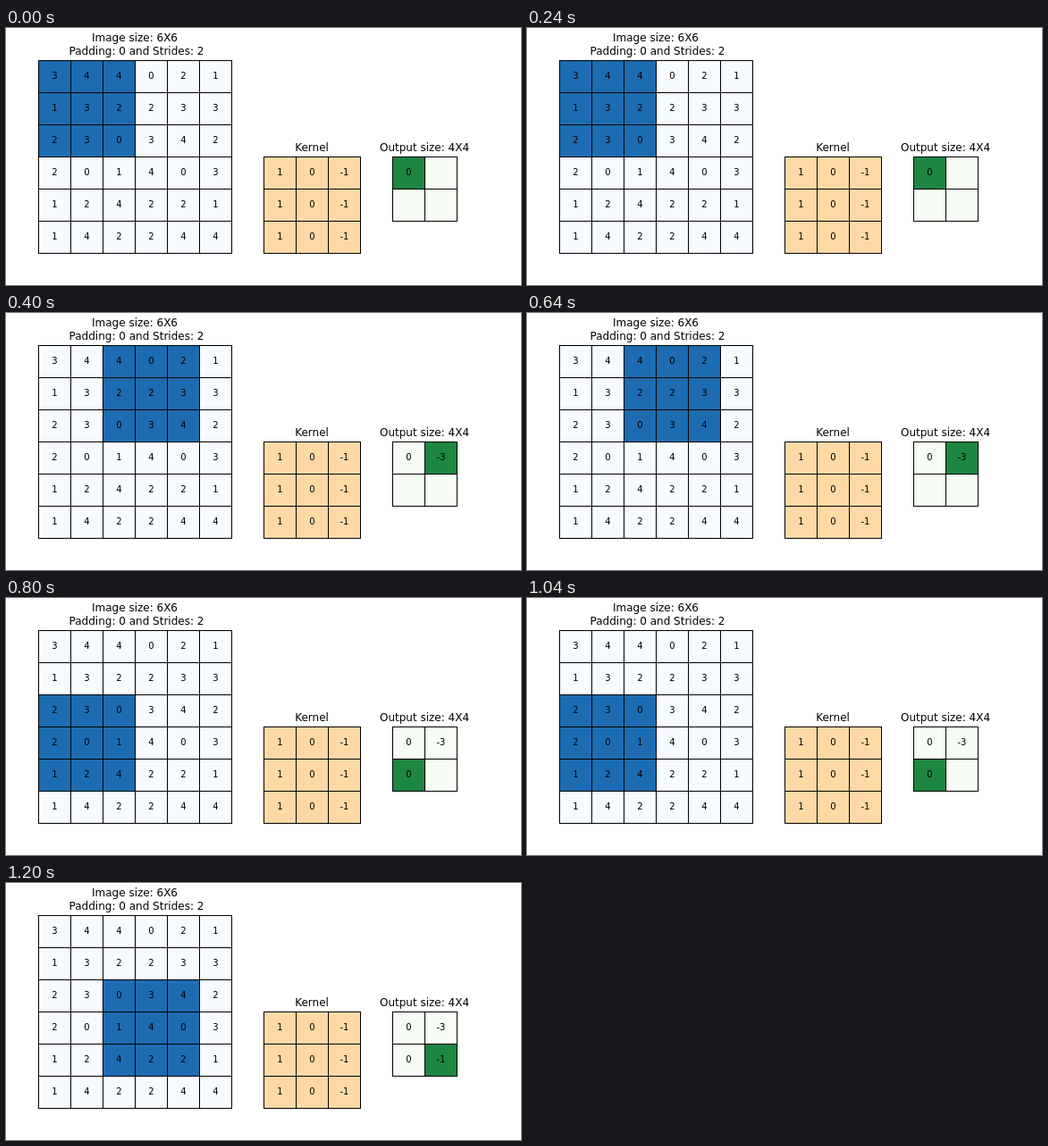
Recreate the animation shown at these times as an HTML page with a canvas. Size 576 px wide and 288 px high, loop 1600 ms.

```html
<!DOCTYPE html>
<html lang="en">
<head>
<meta charset="utf-8">
<title>Strided convolution</title>
<style>
  html, body { margin: 0; width: 100%; height: 100%; overflow: hidden; background: #fff; }
  canvas { display: block; }
</style>
</head>
<body>
<canvas id="stage" width="576" height="288"></canvas>
<script>
const ctx = document.getElementById('stage').getContext('2d');
const CELL = 36, STRIDE = 2, STEP_MS = 400, STEPS = 4;

const image = [
  [3, 4, 4, 0, 2, 1],
  [1, 3, 2, 2, 3, 3],
  [2, 3, 0, 3, 4, 2],
  [2, 0, 1, 4, 0, 3],
  [1, 2, 4, 2, 2, 1],
  [1, 4, 2, 2, 4, 4]
];
const kernel = [[1, 0, -1], [1, 0, -1], [1, 0, -1]];

function convolve(row, col) {
  let sum = 0;
  kernel.forEach((line, r) => line.forEach((weight, c) => {
    sum += weight * image[row * STRIDE + r][col * STRIDE + c];
  }));
  return sum;
}

function label(text, x, y, size) {
  ctx.font = `${size}px "DejaVu Sans", sans-serif`;
  ctx.fillStyle = '#000';
  ctx.fillText(text, x - ctx.measureText(text).width / 2, y);
}

// Draws a square grid; colorAt(row, col) gives the fill of each cell.
function grid(values, left, top, colorAt) {
  const count = values.length, size = count * CELL;
  values.forEach((line, r) => line.forEach((value, c) => {
    const x = left + c * CELL, y = top + r * CELL;
    ctx.fillStyle = colorAt(r, c);
    ctx.fillRect(x, y, CELL, CELL);
    label(String(value), x + CELL / 2 + 0.5, y + 21, 10);
  }));
  ctx.fillStyle = '#000';
  for (let i = 0; i <= count; i++) {
    ctx.fillRect(left + i * CELL, top, 1, size + 1);
    ctx.fillRect(left, top + i * CELL, size + 1, 1);
  }
}

function draw(step) {
  const row = Math.floor(step / 2), col = step % 2;
  const inWindow = (r, c) =>
    r >= row * STRIDE && r < row * STRIDE + 3 &&
    c >= col * STRIDE && c < col * STRIDE + 3;
  const output = [0, 1].map(r => [0, 1].map(c =>
    r * 2 + c <= step ? convolve(r, c) : ''));

  ctx.fillStyle = '#fff';
  ctx.fillRect(0, 0, 576, 288);

  label('Image size: 6X6', 144, 15, 12);
  label('Padding: 0 and Strides: 2', 146, 30, 12);
  grid(image, 36, 36, (r, c) => inWindow(r, c) ? '#1d6cb1' : '#f7fbff');

  label('Kernel', 342, 138, 12);
  grid(kernel, 288, 144, () => '#fed9a6');

  label('Output size: 4X4', 468, 138, 12);
  grid(output, 432, 144, (r, c) => r === row && c === col ? '#1d8641' : '#f7fcf5');
}

function tick() {
  draw(Math.floor(performance.now() / STEP_MS) % STEPS);
  requestAnimationFrame(tick);
}
tick();
</script>
</body>
</html>
```
